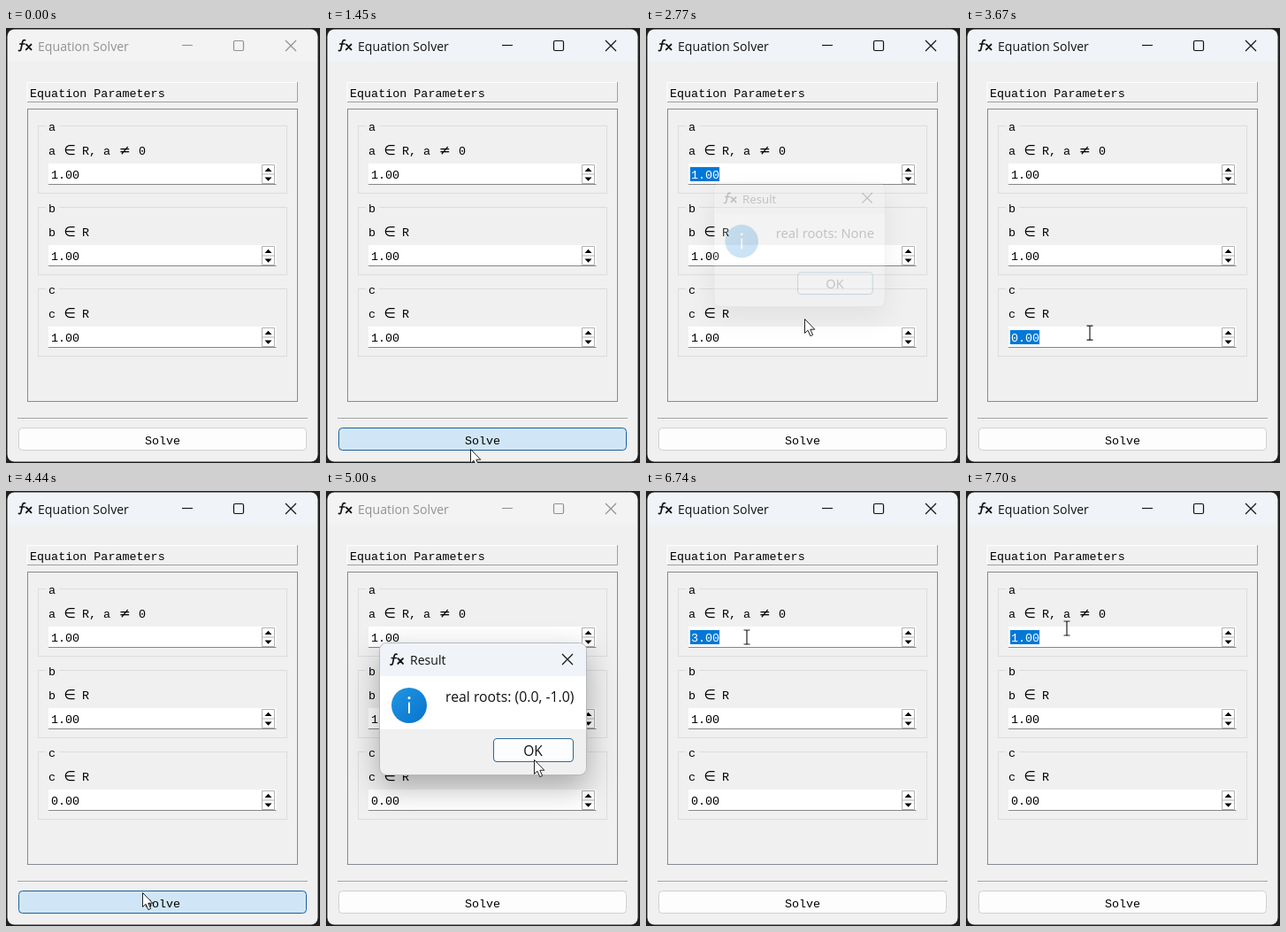
Animation, 355 px wide and 491 px high, one loop 8 s. Source, as an HTML page:

```html
<!DOCTYPE html>
<html lang="en">
<head>
<meta charset="utf-8">
<title>Equation Solver</title>
<style>
  html, body { margin: 0; width: 100%; height: 100%; overflow: hidden; background: #202020; }
  svg { display: block; width: 355px; height: 491px; }
  text { white-space: pre; }
  .ui { font-family: "Open Sans", "Noto Sans", sans-serif; }
  .mono { font: 13.4px "Liberation Mono", monospace; }
  .sym { font: 15.5px "DejaVu Sans", sans-serif; }
  .line { fill: none; stroke: currentColor; }
  #dialog { filter: drop-shadow(0 13px 17px rgba(0,0,0,.3)); }
</style>
</head>
<body>
<svg viewBox="0 0 355 491">
  <defs>
    <linearGradient id="blue" x1="0" y1="0" x2="1" y2="1">
      <stop offset="0" stop-color="#2196e3"/><stop offset="1" stop-color="#0873cc"/>
    </linearGradient>
    <g id="fx" class="line" stroke-linecap="round">
      <path d="M7.6 .8C5.6 .2 4.8 1.4 4.4 3.6L3 10.6C2.7 12.4 1.9 13 .5 12.5M1.8 5H7" stroke-width="1.7"/>
      <path d="M9 5.6L14.5 11.4M14.5 5.6L8.8 11.4" stroke-width="1.9"/>
    </g>
    <path id="cross" class="line" d="M0 0L12 12M12 0L0 12" stroke-width="1.2"/>
  </defs>

  <rect x="1.5" y="1.5" width="351" height="488" rx="8" fill="#f0f0f0"/>
  <path id="bar" d="M2 38V10a8 8 0 0 1 8-8H344a8 8 0 0 1 8 8V38z"/>
  <g id="caption">
    <use href="#fx" x="14" y="13" color="#111"/>
    <text class="ui" x="36" y="26" font-size="14.1" fill="currentColor">Equation Solver</text>
    <path class="line" d="M199 19.5H211" stroke-width="1.1"/>
    <rect class="line" x="257.5" y="14.5" width="11" height="11" rx="1.5" stroke-width="1.2"/>
    <use href="#cross" x="316" y="14"/>
  </g>

  <path class="line" d="M24 84V61.5H330" color="#fff"/>
  <path class="line" d="M24 83.5H329.5V61" color="#a0a0a0"/>
  <text class="mono" x="27" y="78">Equation Parameters</text>
  <rect class="line" x="24.5" y="91.5" width="305" height="330" color="#868a92"/>
  <g id="groups"></g>
  <path class="line" d="M13 440.5H341" color="#a0a0a0"/>
  <path class="line" d="M13 441.5H341" color="#fff"/>
  <rect id="solve" x="14.5" y="451.5" width="325" height="25" rx="4"/>
  <text class="mono" x="177" y="470" text-anchor="middle">Solve</text>

  <g id="dialog">
    <rect id="frame" x=".5" y=".5" height="149" rx="8" fill="#f0f0f0" stroke="#b4b8bd"/>
    <path id="head" fill="#f0f4f9"/>
    <path id="page" fill="#fff"/>
    <use href="#fx" x="12.5" y="12.5" color="#111"/>
    <text class="ui" x="35" y="25" font-size="14.1" fill="#111">Result</text>
    <circle cx="34" cy="71" r="20" fill="url(#blue)"/>
    <path class="line" d="M34 67.5V80" color="#fff" stroke-width="2"/>
    <circle cx="34" cy="62.5" r="1.5" fill="#fff"/>
    <text id="answer" class="ui" x="75" y="67" font-size="15.8" fill="#111"></text>
    <g id="right">
      <use href="#cross" x="-28" y="13" color="#111"/>
      <rect x="-105.5" y="108.5" width="90" height="26" rx="4" fill="#fcfdfe" stroke="#2f6ca0" stroke-width="1.1"/>
      <text class="ui" x="-61" y="128" font-size="15.5" text-anchor="middle" fill="#111">OK</text>
    </g>
  </g>

  <g id="cursor">
    <path id="arrow" d="M.5 .5V16.5L4 13.2L6.8 19.6L9.6 18.4L6.8 12.2H11.8z" fill="#fff" stroke="#222"/>
    <path id="beam" class="line" d="M-3.5 -8H-1Q0 -8 0 -7V7Q0 8 -1 8H-3.5M3.5 -8H1Q0 -8 0 -7M0 7Q0 8 1 8H3.5" color="#222" stroke-width="1.2"/>
  </g>
</svg>
<script>
const LOOP = 8000;
const $ = id => document.getElementById(id);
const set = (el, attrs) => { for (const k in attrs) el.setAttribute(k, attrs[k]); };
const clamp = v => Math.max(0, Math.min(1, v));
const ease = v => v * v * (3 - 2 * v);
const within = (t, a, b) => t >= a && t < b;

// Parameter boxes, 92px apart
$('groups').innerHTML = ['a', 'b', 'c'].map((name, i) => `
  <g transform="translate(0 ${i * 92})">
    <rect class="line" x="36.5" y="110.5" width="281" height="76" color="#dcdcdc"/>
    <path d="M45 108h15v6h-15z" fill="#f0f0f0"/>
    <text class="mono" x="48" y="116">${name}</text>
    <text class="mono" x="48" y="143">${name}<tspan class="sym" x="65.5">∈</tspan><tspan x="86">R${
      i ? '' : ', a</tspan><tspan class="sym" x="128">≠</tspan><tspan x="150">0'}</tspan></text>
    <path d="M48 153h257.500v24h-257.500z" fill="#fff"/>
    <path class="line" d="M48 176.500H305.500" color="#868686"/>
    <rect id="sel${i}" x="50" y="157" width="33" height="16" fill="#0078d7"/>
    <text id="val${i}" class="mono" x="51" y="170"></text>
    <path class="line" d="M289.500 154.500h14v21h-14zM289.500 165h14" color="#b0b0b0"/>
    <path d="M292.500 162h8l-4-4.200zM292.500 168.500h8l-4 4.200z"/>
  </g>`).join('');

// Pointer path: time, x, y
const path = [
  [0, 165, 500], [130, 165, 493], [450, 168, 400], [700, 171, 354], [900, 172, 361],
  [1110, 165, 456], [1310, 163, 457], [1450, 163, 475], [1600, 165, 468],
  [2250, 212, 297], [2600, 206, 300], [2770, 179, 328], [3050, 140, 345],
  [3740, 140, 344], [4440, 154, 453], [4560, 157, 460], [5000, 235, 303],
  [5400, 232, 300], [5840, 137, 298], [6260, 118, 184], [6470, 114, 165],
  [7000, 114, 165], [7210, 114, 190], [7420, 114, 155], [LOOP, 114, 155]
];
function pointer(t) {
  const i = path.findIndex(p => p[0] > t);
  const [a, b] = [path[i - 1], path[i]];
  const k = ease((t - a[0]) / (b[0] - a[0]));
  return [a[1] + (b[1] - a[1]) * k, a[2] + (b[2] - a[2]) * k];
}

const dialogs = [
  { open: 1590, close: 2640, x: 70, y: 169.5, w: 207, text: 'real roots: None' },
  { open: 4600, close: 5420, x: 60, y: 171, w: 235, text: 'real roots: (0.0, -1.0)' }
];

function drawDialog(t) {
  const d = dialogs.find(d => within(t, d.open, d.close + 165));
  $('dialog').style.display = d ? '' : 'none';
  if (!d) return;
  const shown = t < d.close ? ease(clamp((t - d.open) / 140)) : 1 - (t - d.close) / 165;
  const s = 0.924 + 0.076 * shown, w = d.w;
  set($('dialog'), {
    opacity: shown,
    transform: `translate(${d.x + w / 2 * (1 - s)} ${d.y + 75 * (1 - s)}) scale(${s})`
  });
  set($('frame'), { width: w - 1 });
  set($('head'), { d: `M1 38V9a8 8 0 0 1 8-8H${w - 9}a8 8 0 0 1 8 8V38z` });
  set($('page'), { d: `M1 38H${w - 1}V98H1z` });
  set($('right'), { transform: `translate(${w} 0)` });
  $('answer').textContent = d.text;
}

// The wheel steps the first value up to 4, then back to 1
function firstValue(t) {
  if (t < 7560) return 1 + [6610, 6740, 6870].filter(s => t >= s).length;
  return 4 - [7560, 7630, 7700].filter(s => t >= s).length;
}

function draw(t) {
  const modal = dialogs.some(d => within(t, d.open, d.close));
  const active = t >= 1310 && !modal;
  set($('bar'), { fill: active ? '#f0f4f9' : '#f3f3f3' });
  set($('caption'), { color: active ? '#111' : '#919191' });

  const selected = [
    active && (within(t, 2640, 3270) || t >= 5420),
    false,
    within(t, 3270, 4370)
  ];
  [firstValue(t), 1, t < 3410 ? 1 : 0].forEach((v, i) => {
    $('val' + i).textContent = v.toFixed(2);
    set($('val' + i), { fill: selected[i] ? '#fff' : '#000' });
    set($('sel' + i), { opacity: +selected[i] });
  });

  const [x, y] = pointer(t);
  const pressed = within(t, 1310, 1540) || within(t, 4400, 4560);
  const hover = !modal && y > 451 && y < 477;
  const [fill, stroke] = pressed ? ['#d0e6f6', '#1c609c']
    : hover ? ['#e0eef9', '#0078d4'] : ['#fdfdfd', '#d0d0d0'];
  set($('solve'), { fill, stroke });

  drawDialog(t);

  const editing = !modal && [153, 245, 337].some(top => within(y, top, top + 24));
  set($('cursor'), { transform: `translate(${x} ${y})` });
  set($('arrow'), { opacity: +!editing });
  set($('beam'), { opacity: +editing });
}

const start = performance.now();
function tick() {
  draw((performance.now() - start) % LOOP);
  requestAnimationFrame(tick);
}
tick();
</script>
</body>
</html>
```
